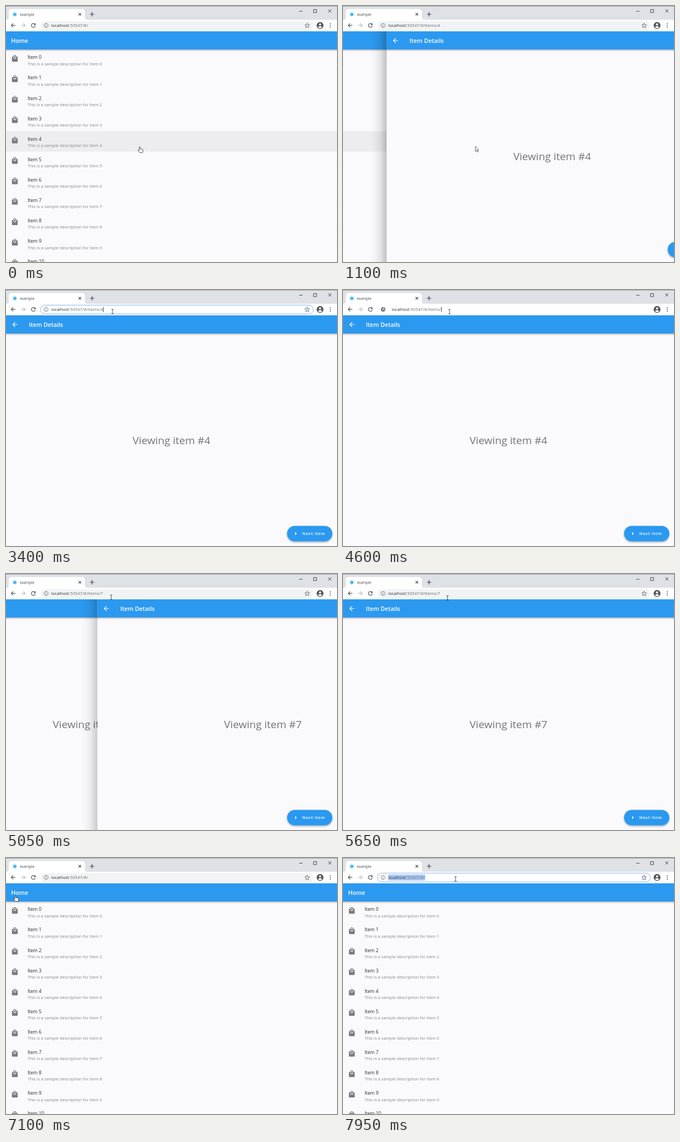
Animation of 600x465 px, one loop 8 s. Source, as an HTML page:

```html
<!DOCTYPE html>
<html lang="en">
<head>
<meta charset="utf-8">
<title>Item browser</title>
<style>
  html, body { margin: 0; width: 100%; height: 100%; overflow: hidden; background: #faf9fb; }
  svg { display: block; width: 600px; height: 465px; font-family: "Open Sans", "Noto Sans", sans-serif; }
  text { white-space: pre; }
</style>
</head>
<body>
<svg id="stage" viewBox="0 0 600 465"></svg>
<script>
const LOOP = 8000;
const BLUE = '#2b99ef', PAPER = '#faf9fb', INK = '#5f6368';
const ROW = 37.1, TOP = 79;
const SLIDE = 400;
const PUSH = 933, REPLACE = 4930, POP = 6683;

const BAG = 'M19 6h-2c0-2.76-2.24-5-5-5S7 3.24 7 6H5c-1.1 0-2 .9-2 2v12c0 1.1.9 2 2 2h14c1.1 0 2-.9 2-2V8c0-1.1-.9-2-2-2zm-7-3c1.66 0 3 1.34 3 3H9c0-1.66 1.34-3 3-3zm0 10c-2.76 0-5-2.24-5-5h2c0 1.66 1.34 3 3 3s3-1.34 3-3h2c0 2.76-2.24 5-5 5z';
const ARROW = 'M20 11H7.83l5.59-5.59L12 4l-8 8 8 8 1.41-1.41L7.83 13H20v-2z';

const rect = (x, y, w, h, fill, more = '') =>
  `<rect x="${x}" y="${y}" width="${w}" height="${h}" fill="${fill}" ${more}/>`;
const text = (x, y, size, fill, str, more = '') =>
  `<text x="${x}" y="${y}" font-size="${size}" fill="${fill}" ${more}>${str}</text>`;
const line = (d, stroke, width = 1, more = '') =>
  `<path d="${d}" fill="none" stroke="${stroke}" stroke-width="${width}" ${more}/>`;
const icon = (d, x, y, fill) =>
  `<path d="${d}" transform="translate(${x} ${y}) scale(.58)" fill="${fill}"/>`;

const appBar = (title, x) =>
  rect(0, TOP, 600, 4, 'url(#drop)') + rect(0, 46, 600, 33, BLUE) +
  text(x, 67.2, 10.7, '#fff', title, 'font-weight="600"');

function homePage() {
  let rows = '';
  for (let i = 0; i < 11; i++) {
    const y = TOP + ROW * i;
    rows += icon(BAG, 9, y + 9.4, '#7b7a7c') +
      text(39.2, y + 17.3, 8.5, '#2a2a2b', 'Item ' + i) +
      text(39.2, y + 28.6, 7.66, '#858487', 'This is a sample description for item ' + i);
  }
  const y = TOP + ROW * 4;
  return `<g id="home">${rect(0, 46, 600, 419, PAPER)}
    ${rect(0, y, 600, ROW, '#000', 'id="hover"')}
    <g clip-path="url(#row)"><circle id="ripple" cx="242" cy="256"/></g>
    ${rows}${appBar('Home', 9.2)}</g>`;
}

const detailPage = n => `<g id="item${n}">
  ${rect(-30, 46, 30, 419, 'url(#edge)', `id="edge${n}"`)}
  ${rect(0, 46, 600, 419, PAPER)}${appBar('Item Details', 41.4)}
  ${icon(ARROW, 9.2, 55.8, '#fff')}
  ${text(300, 279.8, 19, '#757477', 'Viewing item #' + n, 'text-anchor="middle"')}</g>`;

const nextButton = `<g id="next">
  ${rect(509.5, 428.5, 82, 28, BLUE, 'rx="14" filter="url(#lift)"')}
  ${icon('M10 17l5-5-5-5v10z', 518.4, 435.5, '#fff')}
  ${text(537, 445.3, 7.5, '#fff', 'Next Item', 'font-weight="600" letter-spacing=".65"')}</g>`;

const chrome = `
  ${rect(0, 0, 600, 26, '#dee1e6')}${rect(0, 0, 600, .8, '#8e9094')}
  <path d="M0 25.5Q5 25.5 5 20.5V11Q5 5.5 10.500 5.500H137.500Q143 5.500 143 11V20.500Q143 25.500 148 25.500Z" fill="#fff"/>
  ${rect(0, 25, 600, 21, '#fff')}
  <circle cx="16" cy="15.300" r="3.200" fill="#47bdf5"/>
  ${text(25.2, 17.8, 6.6, '#45484c', 'example')}
  ${line('M131.600 12.700l4.600 4.600m0-4.600l-4.600 4.600', '#3c4043', 1.1)}
  ${line('M152 15h8m-4-4v8', '#3c4043', 1.2)}
  ${line('M531.500 9.500h6M557.500 6.500h5.500v5.500h-5.500zM584.200 6.200l5.600 5.600m0-5.600l-5.600 5.600', '#333', .9)}
  ${line('M17 35.200H9.600m3.400-3.500l-3.500 3.500 3.500 3.500', '#54585d', 1.2)}
  ${line('M27.300 35.200h7.400m-3.400-3.500l3.500 3.500-3.500 3.500', '#bcbec2', 1.2)}
  ${line('M52.400 32.900a3.600 3.600 0 1 0 .8 3.200', '#54585d', 1.2)}
  <path d="M53.600 31v3.700h-3.700z" fill="#54585d"/>
  ${rect(62.5, 27.5, 494.5, 16, '#f1f3f4', 'id="pill" rx="8"')}
  <g id="info">${line('M72.700 31.600a3.700 3.700 0 1 0 .01 0M72.700 34.800v2.500M72.700 33v.9', INK, .9)}</g>
  <g id="globe"><circle cx="72.700" cy="35.300" r="4" fill="${INK}"/>
    ${line('M69.600 33.500l2.200 2.200v2.200M74 31.900v1.700h-1.800l.6 2h2.200l1 1.500', '#fff', .9)}</g>
  <g id="star">${line('M546 31.200l1.200 2.900 3.100.2-2.400 2 .8 3.100-2.700-1.700-2.700 1.700.8-3.100-2.400-2 3.100-.2z', INK, .9, 'stroke-linejoin="round"')}</g>
  <circle cx="569.300" cy="35.300" r="6.200" fill="#53575c"/>
  <circle cx="569.300" cy="33.400" r="1.900" fill="#fff"/>
  <path d="M565.500 38.300q3.800-3.600 7.600 0q-3.800 3.800-7.600 0z" fill="#fff"/>
  ${[31.9, 35.3, 38.7].map(y => `<circle cx="587.700" cy="${y}" r=".95" fill="#53575c"/>`).join('')}
  ${rect(82, 30, 67, 11, '#a9c9f4', 'id="mark"')}
  <text id="url" y="38.200" font-size="7.700" fill="#6a6e73"><tspan fill="#2b2d30">localhost</tspan><tspan id="path"></tspan></text>
  ${rect(0, 30.5, .8, 10, '#222', 'id="caret"')}`;

const pointers = `
  <path id="arrow" d="M0 0V9.200L2.200 7.200 3.600 10.300 5 9.700 3.600 6.700H6.200Z" fill="#fff" stroke="#333" stroke-width=".75"/>
  <path id="hand" d="M-.9.600Q0-.700.9.600V4l3.900.9Q6 5.300 5.800 6.700L5 10.800H-.1L-3.100 6.800Q-3.200 5.400-1.700 6L-.9 6.800Z" fill="#fff" stroke="#333" stroke-width=".85" stroke-linejoin="round"/>
  <path id="beam" d="M-2-4H-.5Q0-4 0-3.400 0-4 .5-4H2M0-3.500V3.500M-2 4H-.5Q0 4 0 3.400 0 4 .5 4H2" fill="none" stroke="#333" stroke-width=".85"/>`;

const stage = document.getElementById('stage');
stage.innerHTML = `<defs>
  <linearGradient id="drop" x2="0" y2="1"><stop stop-opacity=".3"/><stop offset=".45" stop-opacity=".1"/><stop offset="1" stop-opacity="0"/></linearGradient>
  <linearGradient id="edge"><stop stop-opacity="0"/><stop offset=".3" stop-opacity=".03"/><stop offset=".6" stop-opacity=".09"/><stop offset="1" stop-opacity=".27"/></linearGradient>
  <filter id="lift" x="-20%" y="-30%" width="140%" height="180%"><feDropShadow dx="0" dy="1.500" stdDeviation="1.700" flood-opacity=".36"/></filter>
  <clipPath id="row">${rect(0, TOP + ROW * 4, 600, ROW, '#000')}</clipPath></defs>` +
  homePage() + detailPage(4) + detailPage(7) + nextButton + chrome + pointers;

const $ = id => document.getElementById(id);
const set = (id, attrs) => { for (const k in attrs) $(id).setAttribute(k, attrs[k]); };
const show = (id, on) => set(id, { visibility: on ? 'visible' : 'hidden' });
const shift = (id, x, y = 0) => set(id, { transform: `translate(${x.toFixed(2)} ${y.toFixed(2)})` });
const clamp = v => Math.max(0, Math.min(1, v));
const span = (t, from, length) => clamp((t - from) / length);

// Cubic Bezier easing (.35, .91, .33, .97)
function ease(v) {
  if (v <= 0 || v >= 1) return clamp(v);
  const at = (s, a, b) => 3 * (1 - s) ** 2 * s * a + 3 * (1 - s) * s * s * b + s ** 3;
  let lo = 0, hi = 1;
  for (let i = 0; i < 24; i++) {
    const mid = (lo + hi) / 2;
    if (at(mid, .35, .33) < v) lo = mid; else hi = mid;
  }
  return at(lo, .91, .97);
}

// time, x, y of the pointer's hot spot
const TRACK = [
  [0, 242.500, 255.500], [850, 242.500, 255.500], [1000, 240, 255], [1850, 240, 255],
  [2200, 195, 38], [2600, 193, 38.500], [4600, 193, 39.500], [5350, 189.500, 43.500],
  [5650, 189.500, 43.500], [6350, 17, 68], [7100, 17, 68], [7300, 48, 58],
  [7550, 204, 38], [LOOP, 204, 38]
];

function pointerAt(t) {
  const i = TRACK.findIndex(k => k[0] > t);
  const [t0, x0, y0] = TRACK[i - 1], [t1, x1, y1] = TRACK[i];
  const v = (t - t0) / (t1 - t0), e = v * v * (3 - 2 * v);
  return [x0 + (x1 - x0) * e, y0 + (y1 - y0) * e];
}

function drawPages(t) {
  const inV = span(t, PUSH, SLIDE), swapV = span(t, REPLACE, SLIDE), outV = span(t, POP, SLIDE);
  const push = ease(inV), swap = ease(swapV), pop = ease(outV);
  const open = push - pop;
  shift('home', -200 * open);
  shift('item4', 600 * (1 - push) - 200 * swap);
  shift('item7', 600 * (1 - swap) + 600 * pop);
  shift('next', 600 * (1 - open));
  show('home', open < 1);
  show('item4', push > 0 && swap < 1);
  show('item7', swap > 0 && pop < 1);
  show('next', open > 0);
  set('edge4', { opacity: ease(inV) });
  set('edge7', { opacity: ease(Math.min(swapV, 1 - outV)) });

  set('hover', { opacity: .05 * (1 - span(t, 950, 320)) });
  set('ripple', { r: 20 + 330 * span(t, 850, 350), opacity: t < 850 ? 0 : .04 * (1 - span(t, 1000, 250)) });
}

function drawAddress(t) {
  const editing = t >= 4250 && t < 4850;
  const selected = (t >= 2700 && t < 3300) || t >= 7850;
  const focused = (t >= 2700 && t < 4250) || t >= 7850;
  let path = ':50547/#/';
  if (t >= 900 && t < POP) path += 'items/' + (t < 4250 ? '4' : t < 4750 ? '' : '7');
  if ($('path').textContent !== path) $('path').textContent = path;

  const x = editing ? 88.200 : 82;
  set('url', { x });
  set('pill', { fill: focused ? '#fff' : '#f1f3f4', stroke: focused ? '#86b5f0' : 'none' });
  show('pill', !editing);
  show('star', !editing);
  show('info', !editing);
  show('globe', editing);

  const width = $('url').getComputedTextLength();
  set('mark', { width });
  show('mark', selected);
  set('caret', { x: x + width + .4 });
  show('caret', editing || (focused && !selected && (t - 3300) % 1060 < 530));
}

function drawPointer(t) {
  const [x, y] = pointerAt(t);
  const kind = y < 46 && x > 62 ? 'beam'
    : t < 950 || (t > 6200 && t < 7150) ? 'hand' : 'arrow';
  for (const id of ['arrow', 'hand', 'beam']) show(id, id === kind);
  shift(kind, x, y);
}

function draw(t) {
  drawPages(t);
  drawAddress(t);
  drawPointer(t);
}

const start = performance.now();
function tick() {
  draw((performance.now() - start) % LOOP);
  requestAnimationFrame(tick);
}
tick();
</script>
</body>
</html>
```
